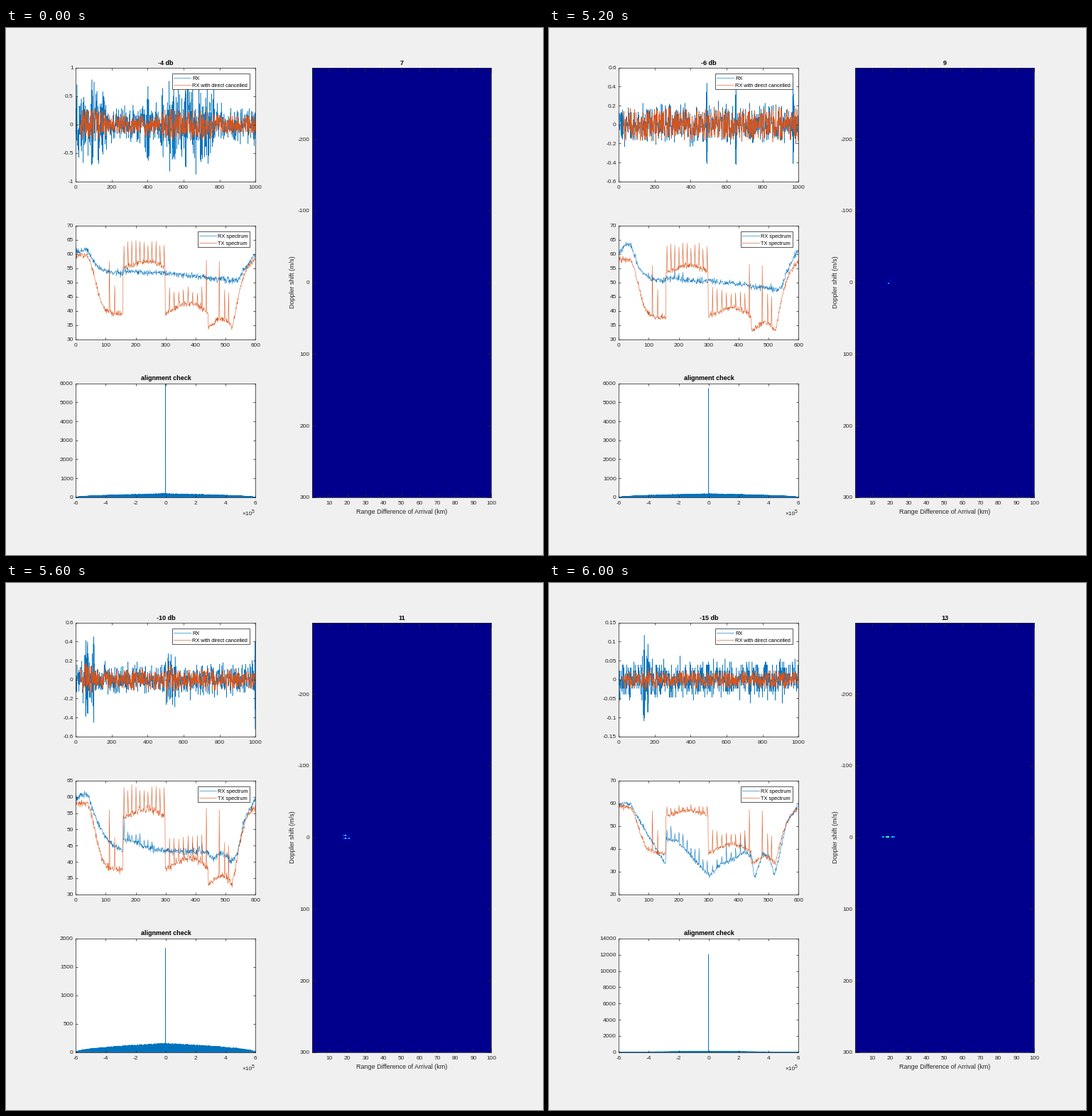
Animation of 756 by 741 pixels, one loop 6200 ms. Source, as a matplotlib script:

```python
import numpy as np
import matplotlib.pyplot as plt
from matplotlib.animation import FuncAnimation
from matplotlib.lines import Line2D
from matplotlib.patches import Rectangle
from matplotlib.transforms import Affine2D

W, H, DPI = 756, 741, 100
PX = 72 / DPI
BLUE, ORANGE, INK, NAVY = "#0072BD", "#D95319", "#262626", "#00008F"
HOLD, STEP = 25, 200
ZERO = 0.0138  # level that the jet map shows as NAVY

plt.rcParams.update({
    "font.family": "Liberation Sans",
    "axes.linewidth": 0.75 * PX,
    "axes.edgecolor": INK,
    "path.simplify": False,
})

T = np.arange(1001)
F = np.arange(601)
LAG = np.linspace(-6, 6, 1501)
COMB = np.r_[161:299:13.4, 313:435:15.5].astype(int)
PILOTS = {112: 56, 130: 47.5, 436: 56.5, 479: 56, 497: 46, 510: 45}

scans = []


def spike(y, x, top):
    y[x] = max(y[x], top)
    y[x + 1] = max(y[x + 1], (y[x + 1] + top) / 2)


def waves(rng, echo, direct, rate, quiet, loud, kick, hits):
    """Received signal, and what is left once the direct path is removed."""
    gain = np.full(T.size, quiet)
    for lo, hi in loud:
        gain[lo:hi] = 1
    gain = np.convolve(np.pad(gain, 7, "edge"), np.ones(15) / 15, "valid")
    speed = np.linspace(*rate, T.size)
    clean = echo * np.sqrt(gain) * np.cos(np.cumsum(speed * rng.normal(size=T.size)))
    clean *= 1 - 0.8 * rng.random(T.size) * np.minimum(speed / 2, 1)
    rx = clean + direct * gain * np.clip(rng.normal(size=T.size) / 2.3, -1, 1)
    for x in hits:
        shape = np.exp(-((T - x) / 3.5) ** 2)
        swing = kick * rng.uniform(0.65, 1) * (-1.0) ** (T - x)
        rx = rx * (1 - shape) + swing * shape
    clean[:25] = 0
    return np.round(rx * 128) / 128, clean


def tx_level():
    y = 37.5 + 20.5 * np.exp(-(np.maximum(F - 35, 0) / 40) ** 2)
    for lo, hi, level, hump in ((158, 299, 53.7, 2.3), (299, 443, 37.8, 3.5),
                                (443, 523, 32.8, 3)):
        u = np.arange(hi - lo) / (hi - lo)
        y[lo:hi] = level + hump * np.sin(np.pi * u ** 1.2)
    y[523:] = 33 + 25 * (1 - np.exp(-((F[523:] - 522) / 33) ** 1.3))
    return y


def spectra(rng, floor, lift, tx_up, comb_top):
    """The receiver's noise floor is added in power to the clean channel."""
    tx = tx_level() + tx_up + rng.normal(0, 0.55, F.size)
    low = np.interp(F, (0, 40, 100, 156, 159, 200, 290, 303, 330, 420, 443, 453,
                        480, 505, 519, 560, 600),
                    (59.5, 59, 45.5, 33, 44.5, 43, 29, 27, 31.5, 38.5, 37, 26,
                     38, 36, 27, 51.5, 58.5))
    for x in COMB:
        spike(tx, x, (comb_top if x < 300 else 48.5) - rng.uniform(0, 2.5))
        spike(low, x, low[x] + rng.uniform(3, 8))
    for x, top in PILOTS.items():
        spike(tx, x, top + tx_up)
    base = np.interp(F, (0, 300, 525), (floor[0], floor[0], floor[1]))
    rx = 10 * np.log10(10 ** (low / 10) + 10 ** (base / 10))
    rx += lift * (np.exp(-((F - 34) / 24) ** 2)
                  + 0.6 * np.exp(-((F - 600) / 40) ** 2))
    return rx + rng.normal(0, 0.55, F.size), tx


def correlation(rng, floor, peak):
    bars = np.zeros(2 * LAG.size)
    bars[1::2] = floor * (1 - np.abs(LAG) / 6) ** 0.5
    bars[1::2] *= rng.uniform(0.75, 1.08, LAG.size)
    bars[LAG.size] = peak
    return bars


def doppler(blobs):
    grid = np.full((300, 100), ZERO)
    for v, r, level, width in blobs:
        row = (v + 299) // 2
        glow = level * np.exp(-((np.arange(1, 101) - r) / width) ** 2)
        grid[row] = np.maximum(grid[row], glow)
    return grid


def nice_step(span):
    """Smallest 1-2-5 step that cuts the span into at most eight parts."""
    steps = (m * 10.0 ** e for e in range(-3, 5) for m in (1, 2, 5))
    return next(s for s in steps if span / s <= 8.001)


def add(db, wave_lim, spec_lim, peak, corr_floor, echo, direct, kick, hits,
        floor, lift, comb_top, tx_up=0, rate=(2, 2), quiet=1.0, loud=(),
        blobs=()):
    rng = np.random.default_rng(40 + len(scans))
    unit = nice_step(peak)
    scans.append(dict(
        db=db,
        limits=(wave_lim, spec_lim, (0, np.ceil(peak / unit) * unit)),
        lines=(*waves(rng, echo, direct, rate, quiet, loud, kick, hits),
               *spectra(rng, floor, lift, tx_up, comb_top),
               correlation(rng, corr_floor, peak)),
        grid=doppler(blobs)))


add(-4, (-1, 1), (30, 70), 6000, 190, echo=.29, direct=.7, quiet=.4,
    loud=((0, 170), (390, 410), (475, 770)), kick=.86,
    hits=(90, 150, 402, 545, 612), floor=(53.3, 50.5), lift=1.5,
    comb_top=65, tx_up=1.4)

add(-5, (-.8, .6), (30, 70), 4650, 195, echo=.25, direct=.1, rate=(.7, 2.6),
    kick=.62, hits=(50, 118, 315), floor=(52, 48), lift=3.5, comb_top=64,
    blobs=((1, 19.7, .38, .8),))

add(-6, (-.6, .6), (30, 70), 5750, 185, echo=.19, direct=.1,
    kick=.56, hits=(490, 652, 970), floor=(50.6, 47.3), lift=4, comb_top=64,
    blobs=((1, 19, .28, .7), (-3, 20.4, .1, .8)))

add(-7, (-.8, .8), (30, 65), 13050, 135, echo=.2, direct=.13, rate=(1.4, 1.4),
    quiet=.35, loud=((250, 470), (530, 640), (850, 940)), kick=.64,
    hits=(388, 552, 600, 634), floor=(50, 45), lift=2, comb_top=61.5,
    blobs=((-1, 19.2, .4, 1.2),))

add(-10, (-.6, .6), (30, 65), 1830, 152, echo=.18, direct=.27, quiet=.45,
    loud=((40, 105), (500, 560)), kick=.58, hits=(56, 66, 100, 1000),
    floor=(43.5, 40), lift=1.5, comb_top=63.8,
    blobs=((-3, 18.8, .42, .9), (1, 18.9, .45, .9), (1, 21, .3, .7)))

add(-15, (-.6, .6), (20, 70), 3640, 122, echo=.03, direct=.08, kick=.54,
    hits=(10, 52, 120, 250, 325, 380, 470, 498, 580, 630, 747, 800, 872, 898),
    floor=(22, 22), lift=.8, comb_top=63.5, tx_up=.5,
    blobs=((-1, 18.6, .42, .7), (-3, 19, .36, .6), (1, 19, .3, .5),
           (3, 19, .28, .4)))

add(-15, (-.15, .15), (20, 70), 12050, 105, echo=.035, direct=.09, quiet=.5,
    loud=((130, 170),), kick=.13, hits=(142, 162), floor=(22, 22), lift=.8,
    comb_top=60, tx_up=.7,
    blobs=((-1, 18.5, .65, .8), (-1, 16, .3, .5), (-1, 21.4, .42, .9)))


fig = plt.figure(figsize=(W / DPI, H / DPI), dpi=DPI, facecolor="#F0F0F0")
pix = Affine2D().scale(1 / W, -1 / H).translate(0, 1) + fig.transFigure


def panel(x0, y0, x1, y1, xlim, xticks, tick):
    ax = fig.add_axes((x0 / W, 1 - y1 / H, (x1 - x0) / W, (y1 - y0) / H))
    ax.set_xlim(*xlim)
    ax.set_xticks(xticks, [str(v) for v in xticks])
    ax.set_axisbelow(False)
    ax.tick_params(direction="in", top=True, right=True, length=tick * PX,
                   width=0.75 * PX, color=INK, labelcolor=INK,
                   labelsize=8.3 * PX)
    ax.tick_params(axis="x", pad=5.5 * PX)
    ax.tick_params(axis="y", pad=3.5 * PX)
    return ax


def label(x, y, s, size=9.05, color=INK, ha="center", va="baseline", **kw):
    return fig.text(x, y, s, transform=pix, fontsize=size * PX, color=color,
                    ha=ha, va=va, **kw)


def trace(ax, x, color):
    return ax.plot(x, np.zeros(len(x)), color=color, lw=0.52 * PX)[0]


def legend(x0, y0, names):
    fig.add_artist(Rectangle((x0, y0), 342.5 - x0, 21.5, transform=pix, fc="w",
                             ec=INK, lw=0.75 * PX, zorder=4))
    for y, name, color in zip((y0 + 6, y0 + 16), names, (BLUE, ORANGE)):
        fig.add_artist(Line2D((x0 + 2.5, x0 + 26.5), (y, y), transform=pix,
                              color=color, lw=0.6 * PX, zorder=5))
        label(x0 + 28.7, y + 2.7, name, 7.4, "k", "left", zorder=5)


def set_range(ax, lo, hi):
    step = nice_step(hi - lo)
    ticks = np.round(np.arange(lo, hi + step / 2, step), 3) + 0.0
    ax.set_ylim(lo, hi)
    ax.set_yticks(ticks, [f"{v:g}" for v in ticks])


wave_ax = panel(98.2, 55.8, 351.2, 215.8, (0, 1000), range(0, 1001, 200), 2.6)
spec_ax = panel(98.2, 277.8, 351.2, 437.8, (0, 600), range(0, 601, 100), 2.6)
corr_ax = panel(98.2, 499.8, 351.2, 659.8, (-6, 6), range(-6, 7, 2), 2.6)
map_ax = panel(431.2, 55.8, 683.2, 659.8, (.5, 100), range(10, 101, 10), 6)

lines = [trace(ax, T if ax is wave_ax else F, color)
         for ax in (wave_ax, spec_ax) for color in (BLUE, ORANGE)]
lines.append(trace(corr_ax, np.repeat(LAG, 2), BLUE))

map_ax.set_facecolor(NAVY)
heat = map_ax.imshow(scans[0]["grid"], cmap="jet", vmin=0, vmax=1,
                     extent=(.5, 100.5, 300, -300), aspect="auto",
                     interpolation="nearest")
map_ax.set_xlim(.5, 100)
map_ax.set_ylim(300, -299.8)
rows = range(-200, 301, 100)
map_ax.set_yticks(rows, [str(v) for v in rows])

legend(233.5, 64, ("RX", "RX with direct cancelled"))
legend(269.5, 286, ("RX spectrum", "TX spectrum"))
db_text = label(225, 51.5, "", color="k", weight="bold")
count_text = label(557.5, 51.5, "", color="k", weight="bold")
label(225, 494.9, "alignment check", color="k", weight="bold")
label(557.3, 683, "Range Difference of Arrival (km)")
label(403.5, 357.5, "Doppler shift (m/s)", rotation=90, va="center")
label(346.3, 685, "×10", 8.3, ha="right")
label(345.8, 682, "5", 6.8, ha="left")


def update(i):
    k = max(0, i - HOLD + 1)
    scan = scans[k]
    for ax, span in zip((wave_ax, spec_ax, corr_ax), scan["limits"]):
        set_range(ax, *span)
    for line, y in zip(lines, scan["lines"]):
        line.set_ydata(y)
    heat.set_data(scan["grid"])
    db_text.set_text(f"{scan['db']} db")
    count_text.set_text(str(7 + k))
    return []


anim = FuncAnimation(fig, update, frames=HOLD + len(scans) - 1, interval=STEP,
                     repeat=True, repeat_delay=0)
plt.show()
```
